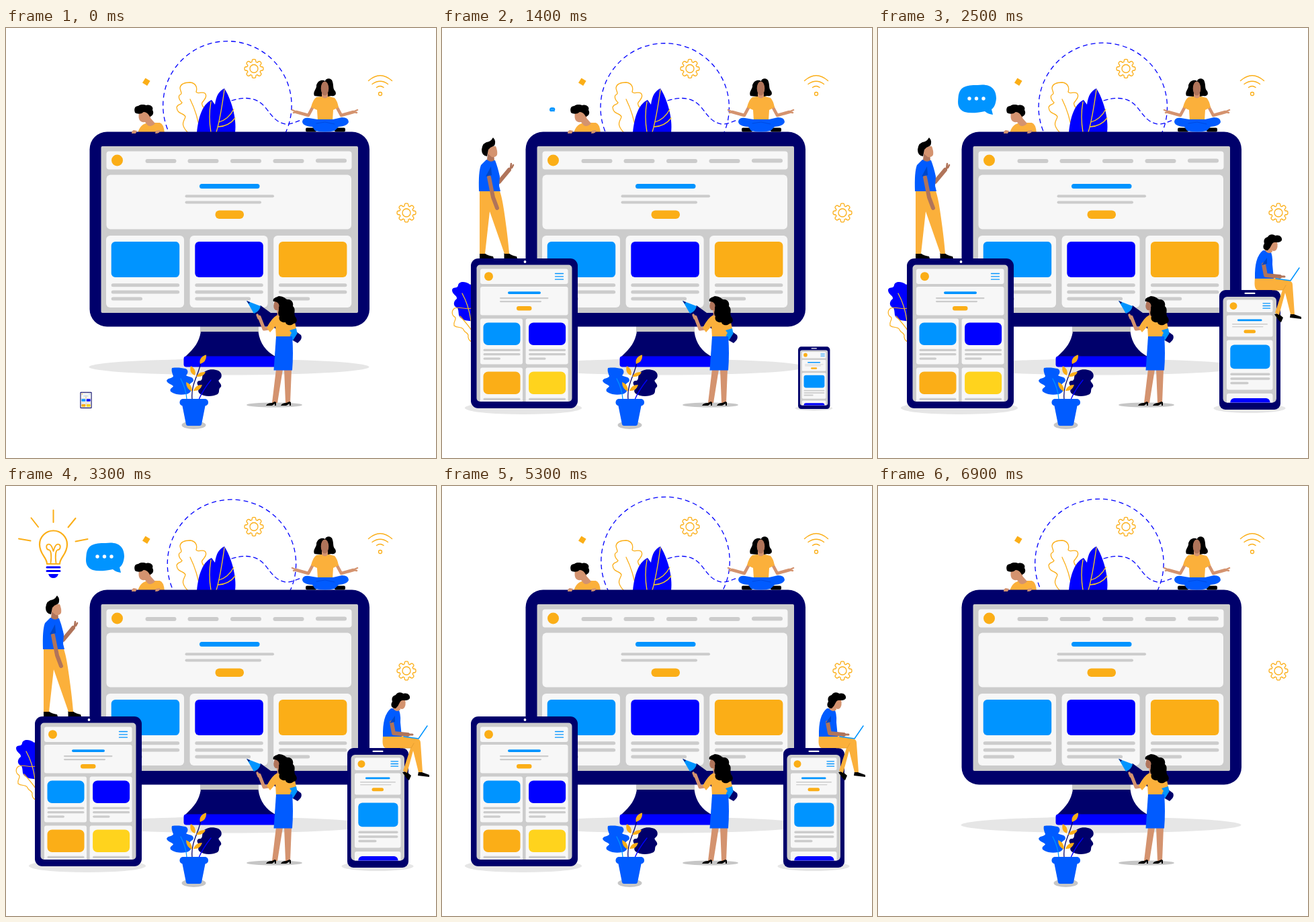
Recreate the animation shown at these times as an HTML page. Size 640 by 640 pixels, loop 7000 ms.

```html
<!DOCTYPE html>
<html lang="en">
<head>
<meta charset="utf-8">
<style>
  html, body { margin: 0; width: 100%; height: 100%; overflow: hidden; background: #fff; }
  svg { display: block; width: 100%; height: 100%; }
</style>
</head>
<body>
<svg id="stage" viewBox="0 0 640 640"></svg>
<script>
const NAVY = '#00006b', BLUE = '#00f', MID = '#005bff', SKY = '#0094ff', ORANGE = '#fbae17',
  SHIRT = '#fbb03b', YELLOW = '#ffd31d', GREY = '#ccc', PAPER = '#f7f7f7',
  SKIN = '#d4936f', DARK = '#b0745a', PALE = '#e6e6e6', BLACK = '#000';

// Shape helpers; boxes take left, top, right, bottom
const box = (x, y, x2, y2, r, fill) =>
  `<rect x="${x}" y="${y}" width="${x2 - x}" height="${y2 - y}" rx="${r}" fill="${fill}"/>`;
const oval = (x, y, rx, ry, fill) => `<ellipse cx="${x}" cy="${y}" rx="${rx}" ry="${ry}" fill="${fill}"/>`;
const dot = (x, y, r, fill) => oval(x, y, r, r, fill);
const ring = (x, y, r, color, w) => `<circle cx="${x}" cy="${y}" r="${r}" fill="none" stroke="${color}" stroke-width="${w}"/>`;
const shape = (d, fill) => `<path d="${d}" fill="${fill}"/>`;
const line = (d, color, w, extra = '') =>
  `<path d="${d}" fill="none" stroke="${color}" stroke-width="${w}" stroke-linecap="round" stroke-linejoin="round" ${extra}/>`;
const group = (id, content) => `<g id="${id}">${content}</g>`;
const bars = (x, ends, y, step, h) => ends.map((end, i) => box(x, y + i * step, end, y + i * step + h, h / 2, GREY)).join('');
const burger = (x, x2, ys) => ys.map(y => line(`M${x} ${y}H${x2}`, SKY, 1.3)).join('');

function gear(cx, cy) {
  const pts = [];
  for (let i = 0; i < 8; i++)
    for (const [a, r] of [[-.29, 10.4], [-.19, 13.2], [-.1, 14], [.1, 14], [.19, 13.2], [.29, 10.4]]) {
      const angle = i * Math.PI / 4 + a;
      pts.push((cx + r * Math.cos(angle)).toFixed(1) + ' ' + (cy + r * Math.sin(angle)).toFixed(1));
    }
  return line(`M${pts.join('L')}Z`, ORANGE, 1.3) + ring(cx, cy, 6, ORANGE, 1.3);
}

const backdrop = () =>
  group('orbit', `<circle r="95.7" fill="none" stroke="${BLUE}" stroke-width="1.3" stroke-dasharray="7 5"/>`) +
  line('M336 108C355 102 372 103 384 116C394 127 400 141 417 143C428 143 433 138 441 137', BLUE, 1.3, 'stroke-dasharray="6 5"') +
  line('M270 155C258 142 266 138 267 132C265 126 255 129 254 118C256 112 261 115 262 111C258 107 256 104 258 100C264 98 259 94 259 89C260 83 267 81 274 81C283 82 285 89 283 95C285 99 291 94 296 97C300 101 296 106 292 111C289 117 299 119 298 127L294 155', ORANGE, 1.3) +
  line('M274 106Q285 128 289 155', ORANGE, 1.3) +
  shape('M284 156C286 136 291 114 306 107L311 114C313 100 317 94 325 90C335 105 344 135 341 156Z', BLUE) +
  line('M325 92Q319 135 313 155M305 110Q301 132 305 155M339 121Q331 136 317 140M341 134Q332 146 316 147', YELLOW, 1.3) +
  `<rect x="204.6" y="76" width="8.4" height="8.4" fill="${ORANGE}" transform="rotate(32 208.8 80.2)"/>` +
  gear(369, 60.5) + gear(596, 275) +
  line('M539.5 78.5Q557 63 574.5 78.5M545 83.5Q557 75 568.5 83.5M551.5 88.5Q557 84.5 562 88.5', ORANGE, 1.4) +
  ring(557, 98, 2.5, ORANGE, 1.3);

const peeker = () =>
  shape('M196 156C199 147 203 142 213 141L229 141Q235 143 236 156Z', SHIRT) +
  shape('M198 126C196 137 200 141 207 140L211 145Q216 148 222 142L215 134L216 124Z', SKIN) +
  shape('M192 126C190 120 192 116 197 116C200 113 206 114 209 115C215 113 220 118 218 122C221 127 218 131 214 132C212 128 209 125 205 125C200 129 195 128 192 126Z', BLACK);

const fingers = () =>
  shape('M187 157Q187 153 190 152L195 153L193 157Z', SKIN) + shape('M222 157L223 153L229 152Q230 157 222 157Z', SKIN);

function monitor() {
  let out = oval(332, 504.5, 208.5, 12, PALE) + box(289, 444, 376, 453, 0, '#c6c6c6') +
    shape('M290 452H375.5C378 470 387 481 401 489H267C281 476 287 468 290 452Z', NAVY) +
    box(264.5, 488.5, 405, 504.5, 4, BLUE) +
    box(124.5, 154.5, 541, 444.5, 26, NAVY) + box(141.5, 176, 524, 424, 2, GREY) +
    box(149.5, 183.5, 514.5, 210.5, 4, PAPER) + dot(165.5, 197, 8.5, ORANGE) +
    [207.5, 270.5, 334, 397.5, 461].map((x, i) => box(x, i < 4 ? 195 : 194.4, x + 46, i < 4 ? 201 : 200.4, 3, GREY)).join('') +
    box(149.5, 218.5, 514, 299.5, 6, PAPER) + box(288, 232, 377.5, 239, 3.5, SKY) +
    bars(266.5, [399, 380], 248.2, 9.4, 4) + box(311.5, 271.5, 354, 284, 6, ORANGE);
  [SKY, BLUE, ORANGE].forEach((color, i) => {
    const x = 149 + i * 124.6;
    out += box(x, 309, x + 116, 416, 6, PAPER) + box(x + 7.7, 318, x + 109.2, 371, 6, color) +
      bars(x + 7.7, [x + 109.2, x + 109.2, x + (i == 1 ? 90.5 : 54)], 380.2, 10.2, 5);
  });
  return out;
}

const yogi = () =>
  shape('M459 101C456 94 463 91 462 85C464 78 471 76 475 79C476 74 485 74 486 80C488 86 486 90 490 94C493 100 488 102 484 101C477 103 468 102 459 101Z', BLACK) +
  line('M457 117L450 130L432 125', SKIN, 4.6) + line('M492 117L499 130L517 125', SKIN, 4.6) +
  line('M433 125L426 122M432 125L428 126M516 125L523 122M517 125L522 126', SKIN, 2.4) +
  shape('M468 102H481L489 104Q493 108 495 118L487 122L486 138H464L463 122L454 118Q457 106 462 103Z', SHIRT) +
  shape('M470 97H479V102Q475 107 470 102Z', SKIN) + oval(474.5, 90, 5.8, 10.5, DARK) +
  box(446, 148.5, 462, 154.5, 2, BLACK) + box(489, 148.5, 505, 154.5, 2, BLACK) +
  shape('M463 136H487L500 133Q510 133 510 140Q508 146 495 147L489 153Q475 156 460 153L456 147Q441 146 441 139Q442 133 451 134Z', MID) +
  line('M462 142L475 140L489 143', '#0046d8', .8);

const painter = () =>
  oval(399.5, 561, 41.5, 3.6, '#c6c6c6') +
  shape('M379 413L439 457Q441 461 438 465L434 469L427 465L368 425Z', NAVY) +
  shape('M358 406L379 414Q377 422 369 425Z', SKY) + shape('M358 406L363 408L361.5 410.5Z', NAVY) +
  shape('M424 446L434 454L427 465L419 458Z', SKY) +
  shape('M402 508H412L404 558H396ZM414 508H425L423 558H416Z', SKIN) +
  shape('M387 562Q389 558 396 558L400 556L402 557V562H400V559L396 562ZM409 562Q411 558 417 558L422 556L424 557V562H422V559L417 562Z', BLACK) +
  line('M391 447L384 448L377 430', SKIN, 5) + line('M376 432L374 427', SKIN, 3.4) +
  shape('M404 427L421 426Q430 430 432 449L424 455L422 461H402L401 444L393 453L388 446Q396 431 404 427Z', SHIRT) +
  shape('M402 459H426Q428 484 426 509.5H398.5Z', MID) +
  shape('M403 419H412V427Q408 432 404 428Z', SKIN) + shape('M399 409Q397 417 401 420H408L411 406L401 405Z', DARK) +
  shape('M398 407C396 402 402 401 406 399C411 399 416 402 418 404C427 403 428 411 427 414C432 419 428 423 430 429C436 436 431 440 428 440C423 445 416 441 416 438C409 439 405 434 407 429C403 425 407 420 406 416C408 412 405 407 398 407Z', BLACK) +
  shape('M422 450L432 447L433 452L429 459Z', SKY);

const pottedPlant = () =>
  oval(279.5, 591, 18, 6, '#c6c6c6') +
  shape('M247 506C256 505 261 506 267 507C272 509 271 514 268 517C272 520 278 518 279 524C279 528 273 528 273 532C278 536 276 544 268 545C259 547 250 545 245 541C243 536 248 536 249 533C246 530 240 529 239 525C241 520 248 522 249 518C247 513 246 510 247 506Z', MID) +
  shape('M295 512C300 508 308 507 316 510C322 513 322 520 318 523C313 526 322 529 320 534C315 538 319 541 315 545C307 549 295 549 288 544C285 541 286 537 289 535C284 531 283 527 287 525C295 526 290 516 295 512Z', NAVY) +
  line('M260 522Q268 537 269 552', SKY, 1.3) + line('M305 524Q293 539 287 553', BLUE, 1.3) +
  line('M277 552C275 530 287 516 290 498', NAVY, 1.3) +
  shape('M289 500C287 494 291 488 298 486.5Q299 497 289 500ZM281 517C275 515 273 509 275 503Q284 508 281 517ZM283 519Q287 511 297 512Q294 520 283 519ZM277 541Q268 537 268 527Q277 530 277 541ZM279 540Q282 531 292 531Q289 541 279 540Z', ORANGE) +
  shape('M262 560H297L291 590Q290.5 592 288 592H271Q268.5 592 268 590Z', MID) + box(258.5, 552, 301, 562.5, 5, MID);

const sidePlants = () =>
  shape('M50 378L42 382C36 377 25 376 24 383C23 389 16 384 15 390C15 397 23 398 22 403C18 406 16 411 20 415C25 417 24 420 25 427C27 434 36 437 50 436Z', BLUE) +
  line('M30 395Q40 413 43 436', YELLOW, 1.2) +
  line('M44 417C35 420 28 414 19 417C13 421 15 428 19 430C23 434 16 436 18 443C23 447 30 444 32 449C34 454 37 452 39 457Q38 464 44 467', ORANGE, 1.2) +
  line('M27 429Q38 441 44 450', ORANGE, 1.2);

function tablet() {
  let cards = '';
  [[SKY, BLUE], [ORANGE, YELLOW]].forEach((row, j) => row.forEach((color, i) => {
    const x = 57 + i * 67.6, y = 432.5 + j * 73;
    cards += box(x, y, x + 63, y + 68, 3, PAPER) + box(x + 4.5, y + 6, x + 59.5, y + 39.5, 7, color) +
      bars(x + 4.5, [x + 59.5, x + 59.5, x + 30], y + 45.2, 6.4, 3.2);
  }));
  return oval(121, 565.5, 87, 9.5, PALE) + box(43, 343, 202, 566, 11, NAVY) + dot(123.5, 348, 1.9, '#fff') +
    box(51.5, 352.5, 193.5, 556, 5, GREY) + box(57, 358.5, 187.5, 381, 3, PAPER) + dot(69.5, 369.7, 6.5, ORANGE) +
    burger(168.5, 180.5, [365.5, 369.8, 374.2]) + box(57, 385, 187.5, 427.5, 3, PAPER) +
    box(98, 392.2, 147, 396, 2, SKY) + bars(86, [158.5, 148], 401, 5, 2.2) + box(111, 414, 133.5, 420.5, 3.2, ORANGE) +
    `<g clip-path="url(#tabletView)">${cards}</g>`;
}

const thinker = () =>
  shape('M56 343V335H63Q68 339 76 340L77 343ZM92.5 343V335H99Q104 339 111 340L112 343Z', BLACK) +
  shape('M56 240H85Q89 250 92 270Q98 310 100 336H93L71 273L64 336H56Z', SHIRT) +
  line('M80 216L85 229L100 211', DARK, 6) + line('M99 212L104 207M102 209L103 202M104 208L106 204', DARK, 2.6) +
  shape('M66 196L79 197Q83 207 86 221L85 235L87 243H55Q54 214 58 204Z', MID) +
  line('M70 222L76 252L82 268', DARK, 6) + shape('M65 221L74 219L73 206Z', '#0047c8') +
  shape('M68 187H77L78 197Q72 201 67 196Z', DARK) + shape('M69 176H80Q83 183 82 189Q79 193 74 192L68 187Z', SKIN) +
  shape('M67 191Q59 190 59 181Q60 170 70 169Q74 167 76 163Q81 168 78 175L72 178L69 181Z', BLACK);

const bubble = () =>
  shape('M148 85C168 82 176 91 176 105C175 115 172 119 169 121L171 129Q163 128 159 124Q140 128 129 125C117 120 119 110 119.5 103C121 87 131 85 148 85Z', SKY) +
  [136, 146.5, 157].map(x => dot(x, 105, 2.7, '#fff')).join('');

function phone() {
  return oval(553, 566, 53.5, 7, PALE) + box(508, 390, 599, 568, 9, NAVY) + box(545.5, 393.8, 561.5, 396, 1, '#fff') +
    box(513.5, 400, 593, 557.5, 6, GREY) + box(519, 404.5, 587.5, 423, 2.5, PAPER) + dot(529, 413.7, 5.5, ORANGE) +
    burger(573, 583.5, [409.8, 413.5, 417.2]) + box(519, 427.5, 587.5, 459.5, 2.5, PAPER) +
    box(535, 433.5, 571.5, 436.2, 1.3, SKY) + bars(527, [580, 573.5], 440, 3.9, 1.4) + box(544.5, 449.2, 562, 454.2, 2.5, ORANGE) +
    box(519, 464.5, 587.5, 538.5, 3, PAPER) + box(524.3, 471.5, 583.5, 507.3, 6, SKY) +
    bars(524.3, [583.5, 583.5, 551.5], 513.6, 6.6, 3.5) +
    `<g clip-path="url(#phoneView)">${box(519, 544, 587.5, 600, 3, PAPER) + box(524.3, 551, 583.5, 590, 6, BLUE)}</g>`;
}

const sitter = () =>
  shape('M590 426L596 425L603 431L600 438L597 436ZM614 425L619 426L630 430V433L613 431Z', BLACK) +
  shape('M561 372H587L611 376Q617 377 617 382L620 426H614L606 394L597 427L591 424L602 390H565Q559 389 561 372Z', SHIRT) +
  line('M587 390H603L607 383', '#e09a2e', .8) +
  shape('M573 331H583Q588 337 587 352L589 373H561Q560 341 573 331Z', MID) +
  line('M574 352L577 368L598 370', DARK, 6) + line('M598 370L605 370', DARK, 3) +
  shape('M571 353L579 351V342Z', '#0047c8') + line('M592 373L614 376L627 357', SKY, 1.5) +
  shape('M577 325H585L587 333Q581 338 576 331Z', SKIN) + shape('M583 318H594Q596 327 592 331Q587 334 582 327Z', SKIN) +
  shape('M580 331C573 331 572 325 575 321C573 314 577 312 580 311C583 306 589 307 591 309C597 307 602 311 601 316C599 320 593 319 590 319C585 320 586 326 580 331Z', BLACK);

const bulb = () =>
  line('M70.5 36V54M37.5 47.5L48 61M103.5 48L92.5 61.5M19 78.5L36.5 81.5M121.5 79L103.5 82.5', ORANGE, 2) +
  line('M61 116C61 106 50 102 50 87A20.5 20.5 0 0 1 91 87C91 102 80 106 80 116Z', ORANGE, 2.2) +
  line('M66.5 115C68 104 67 96 64 95C60 95 59 89 62 87C67 85 69 92 70.5 97C72 92 74 85 79 87C82 89 81 95 77 95C74 96 73 104 74.5 115', ORANGE, 1.8) +
  line('M61 121H80M61 126.5H80', BLUE, 3) + shape('M63 131H78Q76 137 70.5 137Q65 137 63 131Z', BLUE);

const stage = document.getElementById('stage');
stage.innerHTML =
  `<clipPath id="tabletView">${box(51.5, 352.5, 193.5, 556, 5)}</clipPath>
   <clipPath id="phoneView">${box(513.5, 400, 593, 557.5, 6)}</clipPath>` +
  backdrop() + peeker() + monitor() + fingers() + yogi() + painter() + pottedPlant() +
  group('sidePlants', sidePlants()) + group('tablet', tablet()) + group('thinker', thinker()) +
  group('bubble', bubble()) + group('phone', phone()) + group('sitter', sitter()) + group('bulb', bulb());

// Each part: scaling origin, then [time, scale] keys
const pops = {
  tablet: [118.6, 566, [[-50, 0], [500, 1.17], [720, 1], [5350, 1], [5720, 0]]],
  sidePlants: [46, 430, [[900, 0], [1250, 1], [4920, 1], [5250, 0]]],
  thinker: [82, 343, [[850, 0], [1150, 1.1], [1300, 1], [4900, 1], [5250, 0]]],
  phone: [554, 566, [[1104, 0], [1760, 1.15], [2040, 1], [6250, 1], [6400, .75], [6700, 0]]],
  bubble: [167, 124, [[1370, 0], [1400, .14], [1650, 1.4], [1850, 1], [4400, 1], [4750, 0]]],
  sitter: [565, 390, [[1950, 0], [2230, 1.17], [2400, 1], [5750, 1], [6150, 0]]],
  bulb: [70.5, 191, [[2750, 0], [3200, .87], [3290, 1], [3850, 1], [4000, .65], [4100, 0]]]
};

function valueAt(keys, t) {
  const i = keys.findIndex(key => key[0] > t);
  if (i < 1) return 0;
  const [t0, v0] = keys[i - 1], [t1, v1] = keys[i];
  return v0 + (v1 - v0) * (t - t0) / (t1 - t0);
}

const place = (id, transform) => document.getElementById(id).setAttribute('transform', transform);

function draw() {
  const t = performance.now() % 7000, angle = t / 7000 * 2 * Math.PI;
  place('orbit', `translate(${332.7 - 3.3 * Math.cos(angle)} ${115.3 + 3.3 * Math.sin(angle)})`);
  for (const id in pops) {
    const [x, y, keys] = pops[id];
    place(id, `translate(${x} ${y}) scale(${valueAt(keys, t)}) translate(${-x} ${-y})`);
  }
  requestAnimationFrame(draw);
}
draw();
</script>
</body>
</html>
```
